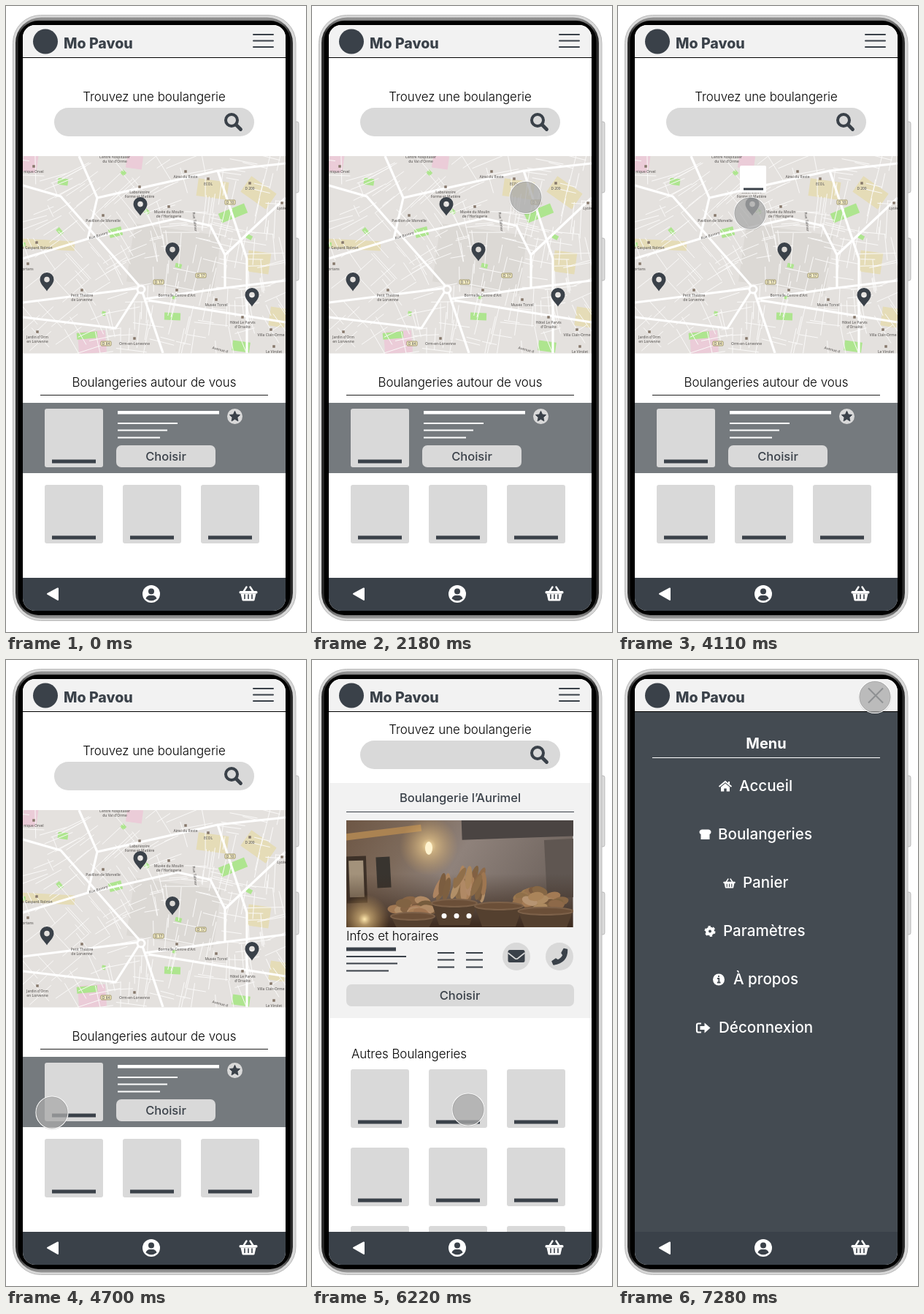
Write an HTML page that moves like this. It is 411x855 px and loops after 8 s.

```html
<!DOCTYPE html>
<html lang="fr">
<head>
<meta charset="utf-8">
<title>Boulangeries</title>
<style>
html, body { margin: 0; height: 100%; overflow: hidden; background: #fff; }
svg { display: block; width: 100vw; height: 100vh; font-family: Inter, "Open Sans", sans-serif; }
.light { font-weight: 300; font-size: 16.9px; fill: #000; }
.medium { font-weight: 500; font-size: 16.5px; }
.item { font-weight: 500; font-size: 20.6px; fill: #fff; }
.mid { text-anchor: middle; }
.tiny { font: 600 4.9px "Open Sans", sans-serif; fill: #6b6866; text-anchor: middle; }
</style>
</head>
<body>
<svg viewBox="0 0 411 855">
  <defs>
    <linearGradient id="edge" x2="0" y2="1">
      <stop offset="0" stop-color="#999"/><stop offset=".025" stop-color="#2c2c2c"/>
      <stop offset=".975" stop-color="#2c2c2c"/><stop offset="1" stop-color="#999"/>
    </linearGradient>
    <linearGradient id="wall" x2="1" y2=".3">
      <stop offset="0" stop-color="#6d5644"/><stop offset=".3" stop-color="#7d6a5b"/>
      <stop offset=".55" stop-color="#8f827b"/><stop offset="1" stop-color="#70655f"/>
    </linearGradient>
    <linearGradient id="shade" x2="0" y2="1">
      <stop offset=".5" stop-color="#3c2a1e" stop-opacity="0"/><stop offset="1" stop-color="#3c2a1e"/>
    </linearGradient>
    <radialGradient id="glow">
      <stop offset="0" stop-color="#ffe9b0"/><stop offset=".25" stop-color="#f3cf8c" stop-opacity=".6"/>
      <stop offset="1" stop-color="#d9a860" stop-opacity="0"/>
    </radialGradient>
    <clipPath id="screen"><rect x="23" y="26" width="360" height="800" rx="17"/></clipPath>
    <clipPath id="mapBox"><rect x="23" y="205" width="360" height="269.5"/></clipPath>
    <clipPath id="photoBox"><rect x="47" y="219" width="311" height="146"/></clipPath>
    <path id="pin" fill-rule="evenodd" fill="#3a4149"
      d="M0 0C-3-5-9.500-10-9.500-16A9.500 9.500 0 0 1 9.500-16C9.500-10 3-5 0 0ZM0-19.700A3.800 3.800 0 1 0 0-12.100A3.800 3.800 0 1 0 0-19.700Z"/>
    <g id="basket">
      <path d="M-7-2L-2.500-9M7-2L2.500-9" stroke="#fff" stroke-width="2.400" stroke-linecap="round"/>
      <rect x="-12.500" y="-3.500" width="25" height="3.500" rx="1.500" fill="#fff"/>
      <path d="M-10.500 0H10.500L8.500 9Q8.200 10 7 10H-7Q-8.200 10-8.500 9Z" fill="#fff"/>
      <path d="M-5 1.500V7M0 1.500V7M5 1.500V7" stroke="#3a4149" stroke-width="1.600" stroke-linecap="round"/>
    </g>
    <g id="search">
      <rect x="66" y="139" width="274" height="39" rx="19.500" fill="#d9d9d9"/>
      <path d="M315 162L321.500 168.500" stroke="#3a4149" stroke-width="4.800" stroke-linecap="round"/>
      <circle cx="309" cy="156" r="8" fill="none" stroke="#3a4149" stroke-width="4"/>
      <text class="light mid" x="203" y="130">Trouvez une boulangerie</text>
    </g>
    <g id="thumb">
      <rect width="80" height="80" rx="3" fill="#d9d9d9"/>
      <rect x="10" y="69.500" width="60" height="5" fill="#3a4149"/>
    </g>
  </defs>

  <g id="phone">
    <rect x="395" y="158" width="6" height="97" rx="2.500" fill="#ddd" stroke="#aaa" stroke-width=".8"/>
    <rect x="395" y="317" width="6" height="58" rx="2.500" fill="#ddd" stroke="#aaa" stroke-width=".8"/>
    <rect x="9.500" y="12.500" width="387.500" height="827" rx="38" fill="#d8d8d8" stroke="#b8b8b8"/>
    <rect x="13" y="15.500" width="380" height="821" rx="35" fill="url(#edge)"/>
    <rect x="16.500" y="20" width="373" height="812" rx="28" fill="#000"/>
  </g>

  <g clip-path="url(#screen)">
    <rect x="23" y="26" width="360" height="800" fill="#fff"/>

    <g id="home">
      <use href="#search"/>
      <g id="map" clip-path="url(#mapBox)"></g>
      <g id="pop">
        <rect x="167" y="218" width="36" height="37" rx="2" fill="#fff"/>
        <rect x="172" y="248.500" width="27" height="3" fill="#3a4149"/>
      </g>
      <text class="light mid" x="203" y="520">Boulangeries autour de vous</text>
      <path d="M47 531.500H359" stroke="#222"/>
      <rect x="23" y="542" width="360" height="96" fill="#757a7e"/>
      <use href="#thumb" x="53" y="550"/>
      <path d="M153 555.300H292" stroke="#fff" stroke-width="4.500"/>
      <path d="M153 570H235M153 579.500H221M153 589.500H211" stroke="#fff" stroke-width="2"/>
      <circle cx="313.500" cy="560.500" r="10.500" fill="#d9d9d9"/>
      <path id="star" fill="#3a4149" stroke="#3a4149" stroke-linejoin="round"/>
      <rect id="pick" x="151" y="600" width="136" height="30" rx="7"/>
      <text id="pickText" class="medium mid" x="219" y="621">Choisir</text>
      <g id="nearby"></g>
    </g>

    <g id="shop">
      <use href="#search" y="-29"/>
      <rect x="23" y="168" width="360" height="321" fill="#f2f2f2"/>
      <text class="medium mid" x="203" y="194" fill="#3a4149">Boulangerie l’Aurimel</text>
      <path d="M47 207.500H359" stroke="#3a4149"/>
      <g id="photo" clip-path="url(#photoBox)"></g>
      <path d="M181 349.500h0m17 0h0m17 0h0" stroke="#fff" stroke-width="7" stroke-linecap="round"/>
      <text class="light" x="47" y="383">Infos et horaires</text>
      <path d="M47 395H115" stroke="#3a4149" stroke-width="5"/>
      <path d="M47 405H129M47 414.500H117M47 424.500H105M172 400h23m16 0h23m-62 9.500h23m16 0h23m-62 10h23m16 0h23"
        stroke="#3a4149" stroke-width="2"/>
      <circle cx="280" cy="405" r="19" fill="#d9d9d9"/><circle cx="339" cy="405" r="19" fill="#d9d9d9"/>
      <rect x="268.500" y="396" width="23" height="17" rx="2.500" fill="#3a4149"/>
      <path d="M268.500 400L278 407.500Q280 409 282 407.500L291.500 400" fill="none" stroke="#d9d9d9" stroke-width="1.600"/>
      <path d="M345 394.500L349.500 395.500Q350 413 331 416L329 411.500L334 408L337 410Q342 407.500 344 403L342 400Z"
        fill="#3a4149" stroke="#3a4149" stroke-width="1.500" stroke-linejoin="round"/>
      <rect x="47" y="443" width="312" height="30" rx="7" fill="#d9d9d9"/>
      <text class="medium mid" x="202.500" y="464" fill="#3a4149">Choisir</text>
      <text class="light" x="54" y="544">Autres Boulangeries</text>
      <g id="others"></g>
    </g>

    <rect x="23" y="26" width="360" height="44" fill="#f2f2f2"/>
    <path d="M23 70.500H383" stroke="#000"/>
    <circle cx="54" cy="48.500" r="17" fill="#3a4149"/>
    <text x="79" y="57.500" font-size="19.600" font-weight="800" fill="#3a4149">Mo Pavou</text>
    <path id="bars" d="M339 39H366M339 47.500H366M339 56H366" stroke="#3a4149" stroke-width="2" stroke-linecap="round"/>

    <g id="menu">
      <rect x="23" y="71" width="360" height="711" fill="#444b52"/>
      <path d="M343 38.500L363 58.500M363 38.500L343 58.500" stroke="#3a4149" stroke-width="2"/>
      <text class="mid" x="203" y="121" font-size="20" font-weight="700" fill="#fff">Menu</text>
      <path d="M47 133.500H359" stroke="#fff"/>
      <g id="items"></g>
      <g fill="#fff">
        <path d="M138.500 173L147 166L155.500 173" fill="none" stroke="#fff" stroke-width="1.800"/>
        <path d="M141 173.500L147 168.500L153 173.500V179.500H148.700V175.500H145.300V179.500H141ZM151 166H153V170L151 168.500Z"/>
        <path d="M115 231.500H124Q127.500 232 127.500 235Q127.500 237.500 125.500 238V245H113.500V238Q111.500 237.500 111.500 235Q111.500 232 115 231.500Z"/>
        <use href="#basket" transform="translate(152.500 305) scale(.66)"/>
        <circle cx="126" cy="370.500" r="4" fill="none" stroke="#fff" stroke-width="4"/>
        <circle cx="126" cy="370.500" r="6.200" fill="none" stroke="#fff" stroke-width="2.600" stroke-dasharray="3.200 3.293"/>
        <circle cx="138" cy="436.500" r="8"/>
        <path d="M136 435H138.300V440.500M135.800 440.500H140.500M138 431V433" stroke="#444b52" stroke-width="1.800" fill="none"/>
        <path d="M114 496.500H110Q108 496.500 108 498.500V506.500Q108 508.500 110 508.500H114" fill="none" stroke="#fff" stroke-width="2.200"/>
        <path d="M112.500 500H118.500V495.500L126.500 502.500L118.500 509.500V505H112.500Z"/>
      </g>
    </g>

    <rect x="23" y="781" width="360" height="45" fill="#3a4149"/>
    <path d="M57 803L71 795.500V811Z" fill="#fff" stroke="#fff" stroke-width="2" stroke-linejoin="round"/>
    <circle cx="199" cy="803" r="12" fill="#fff"/>
    <circle cx="199" cy="799.500" r="4" fill="#3a4149"/>
    <path d="M191.500 809.500Q193 805 197 805H201Q205 805 206.500 809.500Q199 815 191.500 809.500Z" fill="#3a4149"/>
    <use href="#basket" x="332" y="802.500"/>
  </g>

  <g id="touch">
    <circle r="22.800" fill="#000" opacity=".12" cy=".8"/>
    <circle r="22" fill="#b2b2b2" fill-opacity=".72" stroke="#fff" stroke-width="1.200"/>
    <circle r="21.200" fill="none" stroke="#888" stroke-opacity=".5" stroke-width=".8"/>
  </g>
  <g id="hand">
    <circle id="click" r="11.500" fill="#c3c400" opacity=".75"/>
    <path d="M-1.500 10V0Q-1.500-2 .3-2Q2.200-2 2.200 0V6Q5 5 6 7Q8.500 6.300 9.300 8.200Q12 7.800 12 10.500V15Q12 18 10 20V23H1V20.500L-5 13Q-6 10.500-4 10Q-3 9.800-1.500 12Z"
      fill="#fff" stroke="#000" stroke-width="1.200" stroke-linejoin="round"/>
    <path d="M2.500 13V18.500M5.300 13V18.500M8 13V18.500" stroke="#000"/>
  </g>
</svg>

<script>
const $ = id => document.getElementById(id);
const repeat = (n, make) => Array.from({ length: n }, (_, i) => make(i)).join("");

let seed = 11;
const rnd = () => (seed = seed * 16807 % 2147483647) / 2147483647;

const block = (x, y, w, h, fill, turn = 8) =>
  `<rect x="${-w / 2}" y="${-h / 2}" width="${w}" height="${h}" fill="${fill}" transform="translate(${x} ${y}) rotate(${turn})"/>`;

// Tiny map text: "/" breaks the line, a marker sits above upright labels
const label = (x, y, text, turn) =>
  (turn ? "" : block(x, y - 7, 3.5, 3.5, "#85776a", 0)) + text.split("/").map((line, i) =>
    `<text class="tiny" transform="translate(${x} ${y + 2 + i * 6}) rotate(${turn || 0})">${line}</text>`).join("");

const badge = (x, y, text) =>
  `<rect x="${x - 7}" y="${y - 3}" width="14" height="6" rx="1" fill="#f3ecc4" stroke="#8e8452" stroke-width=".8"/>
   <text class="tiny" x="${x}" y="${y + 2}">${text}</text>`;

function lane() {
  const x = 23 + rnd() * 360, y = 205 + rnd() * 270, r = 8 + rnd() * 20;
  const a = Math.sin(x / 60 + y / 110) / 2 - .25 + (rnd() < .5 ? Math.PI / 2 : 0);
  const dx = r * Math.cos(a), dy = r * Math.sin(a);
  return `M${x - dx} ${y - dy}L${x + dx} ${y + dy}`;
}

function drawMap() {
  const yellow = "#e5dcb7", green = "#aee58f", pink = "#ebccd8";
  const avenues = `M23 245L75 260L185 385L190 400L300 385L383 375M100 205L125 262L290 225L383 215
    M125 262L112 318L235 290L280 300L300 340V385M185 385L150 440L23 425M23 345L112 318M185 385L23 405
    M290 225L330 345V474M190 400L215 474M383 262L300 340M383 432L195 402`;
  $("map").innerHTML = block(203, 340, 360, 270, "#e4e1de", 0) + block(230, 345, 120, 80, "#dcd9d5") +
    block(283, 250, 42, 24, yellow) + block(346, 255, 42, 26, yellow, 35) + block(346, 350, 31, 29, yellow) +
    block(58, 326, 72, 13, yellow, 3) + block(372, 425, 22, 26, yellow) +
    block(118, 459, 38, 30, pink, -4) + block(176, 213, 22, 18, pink) + block(33, 215, 20, 24, pink) +
    block(311, 283, 38, 14, green, -22) + block(78, 240, 14, 9, green) + block(150, 309, 18, 12, green, -15) +
    block(111, 450, 28, 9, green, -5) + block(228, 424, 22, 10, green, 2) + block(322, 465, 24, 14, green) +
    repeat(8, () => block(23 + rnd() * 360, 205 + rnd() * 270, 5 + rnd() * 8, 6, green, rnd() * 60)) +
    `<path d="${repeat(260, lane)}" stroke="#faf9f8"/>
     <path d="${avenues}" fill="none" stroke="#fff" stroke-width="3.200" stroke-linejoin="round"/>
     <circle cx="185" cy="387" r="5" fill="#e4e1de" stroke="#fff" stroke-width="3"/>` +
    label(38, 226, "nique Orvel") + label(149, 206, "Centre hospitalier/du Val d'Orme") +
    label(246, 233, "Ainsi du Reste") + label(277, 243, "ECOL") + label(334, 249, "D 200") +
    label(183, 254, "Laboratoire/Forme et Matière") + label(223, 281, "Musée du Moulin/de l'Horlogerie") +
    label(133, 293, "Pavillon de Morvelle") + label(127, 313, "Rue Bavory", -17) + label(257, 293, "Rue Talmer", 83) +
    label(42, 330, "le Gaspard Rolmin") + label(30, 359, "ortans") + label(104, 395, "Petit Théâtre/de Lorvenne") +
    label(234, 395, "Bormelle Centre d'Art") + label(288, 408, "Musée Torvel") + label(378, 276, "Lycée") +
    label(324, 432, "Hôtel Le Parvis/d'Orsalte") + label(363, 449, "Villa Clair-Orme") + label(367, 472, "Le Virolet") +
    label(43, 452, "Jardin d'Orm/en Lorvenne") + label(176, 461, "Orm-en-Lorvenne") + label(293, 469, "Avenue d", 14) +
    badge(307, 268, "D 10") + badge(209, 377, "D 17") + badge(267, 368, "D 17") + badge(137, 461, "D 64") +
    `<use href="#pin" x="184" y="286.500"/><use href="#pin" x="228" y="348.500"/>
     <use href="#pin" x="56" y="389.500"/><use href="#pin" x="337" y="410.500"/>`;
}

function drawPhoto() {
  // A heap of loaves fills an ellipse around (x, y)
  const heap = (n, x, y, w, h, rx, ry, lean) => repeat(n, () => {
    const a = rnd() * 7, r = Math.sqrt(rnd());
    return `<ellipse rx="${rx}" ry="${ry}" fill="hsl(${27 + rnd() * 6} 32% ${34 + rnd() * 24}%)"
      transform="translate(${x + w * r * Math.cos(a)} ${y + h * r * Math.sin(a)}) rotate(${lean + rnd() * 40})"/>`;
  });
  const basket = (x, y, w, h) =>
    `<path d="M${x - w / 2} ${y}h${w}l-10 ${h}h${20 - w}z" fill="#54402f"/>
     <ellipse cx="${x}" cy="${y}" rx="${w / 2}" ry="5" fill="#6b4f38" stroke="#7d6149" stroke-width="2"/>`;
  const light = (x, y, r) => `<circle cx="${x}" cy="${y}" r="${r}" fill="url(#glow)"/>`;
  $("photo").innerHTML = block(202, 292, 311, 146, "url(#wall)", 0) +
    block(285, 226, 160, 34, "#4a4442", -2) + block(95, 236, 110, 9, "#ab8352", -7) + block(340, 285, 40, 80, "#5f5651", -3) +
    block(61, 300, 28, 64, "#3d3128", -2) + block(61, 299, 20, 50, "#a3927b", -2) + block(98, 290, 19, 42, "#38342f", -3) +
    block(202, 292, 311, 146, "url(#shade)", 0) +
    light(160, 254, 40) + light(72, 354, 34) + `<ellipse cx="160" cy="257" rx="5" ry="9" fill="#fff3cf"/>` +
    heap(26, 205, 308, 32, 16, 4.5, 16, -10) + heap(26, 312, 328, 30, 13, 11, 6, -20) + heap(20, 137, 338, 30, 12, 11, 6, -20) +
    basket(195, 332, 62, 30) + basket(256, 336, 66, 28) + basket(320, 343, 75, 26) + basket(138, 350, 60, 20);
}

const shelf = y => repeat(3, i => `<use href="#thumb" x="${53 + i * 107}" y="${y}"/>`);
const item = (x, row, text) => `<text class="item" x="${x}" y="${179 + row * 66}">${text}</text>`;

drawMap();
drawPhoto();
$("star").setAttribute("d", "M" + Array.from({ length: 10 }, (_, i) => {
  const r = i % 2 ? 3.5 : 7.5, a = i * Math.PI / 5;
  return `${313.5 + r * Math.sin(a)} ${560.8 - r * Math.cos(a)}`;
}).join("L") + "Z");
$("nearby").innerHTML = shelf(654);
$("others").innerHTML = repeat(3, i => shelf(559 + i * 107));
$("items").innerHTML = item(166, 0, "Accueil") + item(137, 1, "Boulangeries") + item(171, 2, "Panier") +
  item(144, 3, "Paramètres") + item(158, 4, "À propos") + item(138, 5, "Déconnexion");

// Eased pointer moves; it rests in between. A sway bends the way.
const { sin, PI } = Math;
const moves = [
  { from: 1180, to: 1850, x: 290, y: 268 },
  { from: 2040, to: 2840, x: 246, y: 272, sway: u => [85 * sin(PI * u) ** 4, -28 * sin(2 * PI * u) * sin(PI * u) ** 2] },
  { from: 2970, to: 3110, x: 155, y: 276 },
  { from: 3250, to: 3450, x: 181, y: 283 },
  { from: 4110, to: 4700, x: 63, y: 618 },
  { from: 4970, to: 5230, x: 214, y: 614, sway: u => [0, -54 * sin(PI * u)] },
  { from: 6220, to: 6350, x: 172, y: 626 },
  { from: 6350, to: 6820, x: 360, y: 52 },
  { from: 6820, to: 7010, x: 352, y: 50.5 },
];

function pointer(t) {
  let x = 8, y = 432;
  for (const m of moves) {
    const u = Math.min(1, Math.max(0, (t - m.from) / (m.to - m.from)));
    const e = u * u * (3 - 2 * u);
    const [dx, dy] = m.sway ? m.sway(u) : [0, 0];
    x += (m.x - x) * e + dx;
    y += (m.y - y) * e + dy;
  }
  return [x, y];
}

const show = (id, on) => $(id).style.display = on ? "" : "none";

function draw(now) {
  const t = now % 8000;
  const [x, y] = pointer(t);
  const hover = t >= 4970 && t < 5560 && x > 151;
  const place = `translate(${x} ${y})`;
  $("touch").setAttribute("transform", place);
  $("hand").setAttribute("transform", place);
  show("touch", t >= 1180 && !hover);
  show("hand", hover);
  show("click", t >= 5430);
  show("home", t < 5560);
  show("shop", t >= 5560);
  show("pop", t > 3030 && t < 3110 || t >= 3320 && t < 4240);
  $("pick").setAttribute("fill", hover ? "#3a4149" : "#d9d9d9");
  $("pickText").setAttribute("fill", hover ? "#d9d9d9" : "#3a4149");
  const fade = t < 7080 ? 0 : Math.min(1, .25 + (t - 7080) / 267);
  $("menu").setAttribute("opacity", fade);
  $("bars").setAttribute("opacity", 1 - fade);
  requestAnimationFrame(draw);
}
requestAnimationFrame(draw);
</script>
</body>
</html>
```
